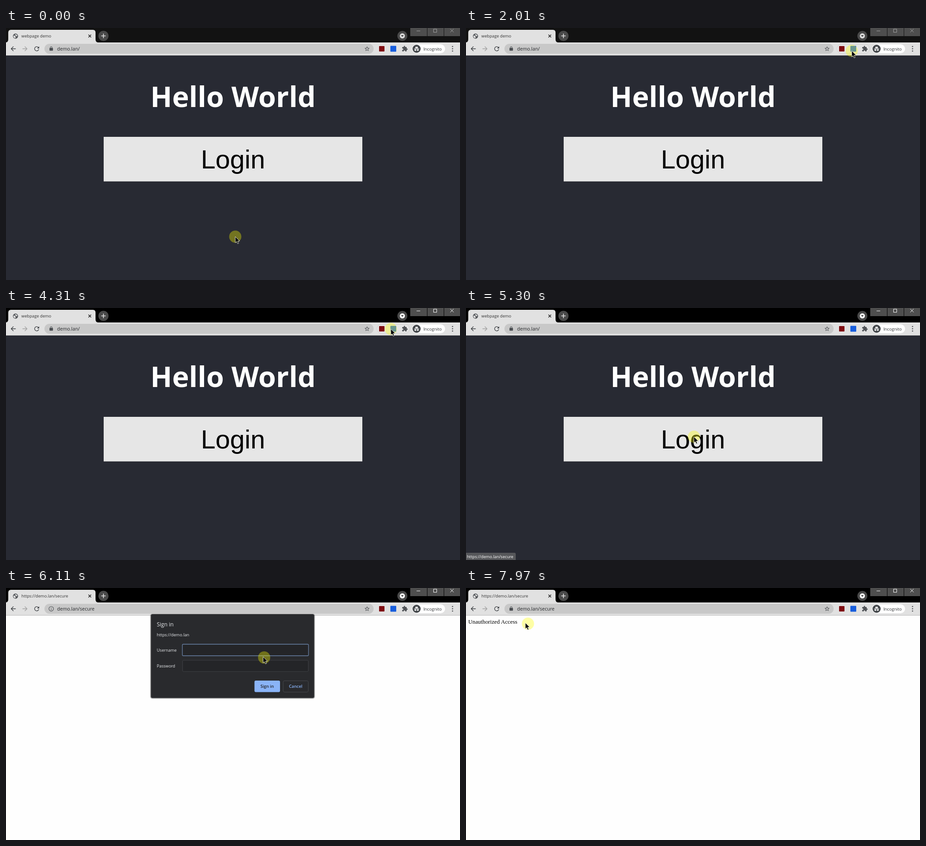
These frames come from a looping animation (1004 by 558 pixels, 8000 ms). An HTML page:

```html
<!DOCTYPE html>
<html lang="en">
<head>
<meta charset="utf-8">
<title>webpage demo</title>
<style>
  html, body { margin: 0; width: 100%; height: 100%; overflow: hidden; background: #282a33; }
  svg { position: absolute; left: 0; top: 0; width: 1004px; height: 558px; }
  text { font-family: "Open Sans", "Noto Sans", sans-serif; white-space: pre; }
  #dialog { transform-origin: 501px 150.5px; }
</style>
</head>
<body>
<svg id="base" viewBox="0 0 1004 558"></svg>
<svg id="dialog" viewBox="0 0 1004 558"></svg>
<svg id="top" viewBox="0 0 1004 558"></svg>
<script>
const LOOP = 8000;
const $ = id => document.getElementById(id);

// Icon outlines on a 24 unit grid
const ICONS = {
  back: 'M20 11H7.83l5.59-5.59L12 4l-8 8 8 8 1.41-1.41L7.83 13H20z',
  reload: 'M17.65 6.35A7.96 7.96 0 0 0 12 4a8 8 0 1 0 7.73 10h-2.08A6 6 0 1 1 12 6c1.66 0 3.14.69 4.22 1.78L13 11h7V4z',
  star: 'M22 9.24l-7.19-.62L12 2 9.19 8.63 2 9.24l5.46 4.73L5.82 21 12 17.27 18.18 21l-1.63-7.03zM12 15.4l-3.76 2.27 1-4.28-3.32-2.88 4.38-.38L12 6.1l1.71 4.04 4.38.38-3.32 2.88 1 4.28z',
  puzzle: 'M20.5 11H19V7c0-1.1-.9-2-2-2h-4V3.5a2.5 2.5 0 0 0-5 0V5H4c-1.1 0-2 .9-2 2v3.8h1.5a2.7 2.7 0 0 1 0 5.4H2V20c0 1.1.9 2 2 2h3.8v-1.5a2.7 2.7 0 0 1 5.4 0V22H17c1.1 0 2-.9 2-2v-4h1.5a2.5 2.5 0 0 0 0-5z',
  lock: 'M18 9h-1V7A5 5 0 0 0 7 7v2H6a2 2 0 0 0-2 2v9a2 2 0 0 0 2 2h12a2 2 0 0 0 2-2v-9a2 2 0 0 0-2-2zM9 9V7a3 3 0 0 1 6 0v2z',
  info: 'M11 7h2v2h-2zm0 4h2v6h-2zm1-9a10 10 0 1 0 0 20 10 10 0 0 0 0-20zm0 18a8 8 0 1 1 0-16 8 8 0 0 1 0 16z',
  folder: 'M9 3H3a2 2 0 0 0-2 2v14a2 2 0 0 0 2 2h18a2 2 0 0 0 2-2V8a2 2 0 0 0-2-2h-9z',
  plane: 'M23 1L1 13l5 2.5L19 5 9 17v6l3.5-4.5L19 21z',
  sync: 'M2 10a10 10 0 0 1 17-5l3-3v8h-8l3-3a7 7 0 0 0-12 3zM22 14a10 10 0 0 1-17 5l-3 3v-8h8l-3 3a7 7 0 0 0 12-3z',
  popout: 'M2 2h11l-3.5 3.5 10 10-3 3-10-10L2 13zM16 4h4a2 2 0 0 1 2 2v14a2 2 0 0 1-2 2H6a2 2 0 0 1-2-2v-4l3-1v4h12V7h-4z',
  plus: 'M9 2h6v7h7v6h-7v7H9v-7H2V9h7z',
  hat: 'M8 3l4 1 4-1 2 7H6zM1 11h22v2H1zM6.5 14a3.5 3.5 0 0 1 3.4 2.7h4.2a3.5 3.5 0 1 1 0 1.6H9.9A3.5 3.5 0 1 1 6.5 14z',
  globe: 'M12 1a11 11 0 1 0 0 22 11 11 0 0 0 0-22zM4 9l6 2 3 4-2 6a9 9 0 0 1-7-12zM11 4l7 2 2 5-4 2-2-3-4-2z'
};

const rect = (x, y, w, h, fill, more = '') =>
  `<rect x="${x}" y="${y}" width="${w}" height="${h}" fill="${fill}" ${more}/>`;
const circle = (x, y, r, fill, more = '') =>
  `<circle cx="${x}" cy="${y}" r="${r}" fill="${fill}" ${more}/>`;
const line = (d, color, w = 1, more = '') =>
  `<path d="${d}" fill="none" stroke="${color}" stroke-width="${w}" ${more}/>`;
const text = (s, x, y, size, fill, more = '') =>
  `<text x="${x}" y="${y}" font-size="${size}" fill="${fill}" ${more}>${s}</text>`;
const icon = (name, cx, cy, size, fill, more = '') =>
  `<path d="${ICONS[name]}" fill="${fill}" fill-rule="evenodd" transform="translate(${cx - size / 2} ${cy - size / 2}) scale(${size / 24})" ${more}/>`;
const group = (id, body) => `<g id="${id}">${body}</g>`;
const mid = 'text-anchor="middle"';

function gear(x, y, r) {
  const step = 2 * Math.PI * r / 16;
  return circle(x, y, r * .8, 'none', `stroke="#a8a8a8" stroke-width="${r * .6}"`) +
    circle(x, y, r, 'none', `stroke="#a8a8a8" stroke-width="${r * .7}" stroke-dasharray="${step}"`);
}

function windowBar() {
  return rect(0, 0, 1004, 32, '#121212', 'id="title"') +
    '<path d="M0 32Q5 31 5 25V10Q5 4 11 4H192Q198 4 198 10V25Q198 31 203 32z" fill="#e1e1e1"/>' +
    icon('globe', 21, 18, 12.5, '#55585c', 'id="favicon"') +
    text('webpage demo', 34, 21, 9.2, '#333', 'id="tab"') +
    line('M182.3 14.8l6 6m0-6l-6 6', '#222', 1.5) +
    circle(215.5, 17.5, 11.2, '#494949') +
    line('M210.5 17.5h10m-5-5v10', '#e8e8e8', 1.6) +
    circle(876.5, 17.5, 11, '#494949') +
    circle(876.5, 17.5, 5.7, '#d8d8d8', 'id="menu"') +
    '<path d="M873.5 16h6l-3 3.6z" fill="#333"/>' +
    rect(894, 0, 37, 18, '#4e4e4e') + rect(932, 0, 36, 18, '#4e4e4e') + rect(969, 0, 35, 18, '#4e4e4e') +
    line('M908 6.5h8M945.5 2.5h7v7h-7zM982.5 2l7.5 7.5m0-7.5l-7.5 7.5', '#a2a2a2', 1, 'id="marks"');
}

function toolbar() {
  return rect(0, 32, 1004, 29, '#e1e1e1') + rect(0, 60, 1004, 1, '#b9b9b9') +
    icon('back', 16, 46, 16.5, '#3c3f43') +
    `<g transform="translate(84 0) scale(-1 1)">${icon('back', 42, 46, 16.5, '#a3a3a3')}</g>` +
    icon('reload', 68, 46, 16, '#3c3f43') +
    rect(85, 35, 728, 22, '#c8c8c8', 'rx="11"') +
    icon('lock', 100, 45.5, 11.5, '#4b4e52', 'id="lock"') +
    icon('info', 100, 46, 13.5, '#4b4e52', 'id="info"') +
    text('demo.lan/', 113, 50, 10.55, '#26282b', 'id="url"') +
    icon('star', 798.5, 46, 13.5, '#4b4e52') +
    rect(820, 36, 73, 20, '#e5e5e5', 'id="capsule" rx="10" stroke="#cfcfcf"') +
    circle(856.5, 46, 10, '#c3c6cb', 'id="pressed"') +
    rect(825, 40, 12, 12, '#7f0c12', 'rx="1"') +
    rect(850, 39.5, 13, 13, '#175ddc', 'rx="1"') +
    icon('puzzle', 882, 46, 14, '#505357') +
    rect(898, 36, 73, 20, '#fff', 'rx="10"') +
    circle(908, 46, 9, '#45484c') + icon('hat', 908, 46, 12.5, '#fff') +
    text('Incognito', 923, 49.5, 9.4, '#2c2e31') +
    [41, 46, 51].map(y => circle(987.5, y, 1.35, '#45484c')).join('');
}

function home() {
  return rect(0, 61, 1004, 497, '#282a33') +
    text('Hello World', 502, 175, 63, '#fff', mid + ' font-weight="700"') +
    rect(216, 241, 572, 98.7, '#e6e6e6') +
    text('Login', 502, 311, 58, '#000', mid + ' style="font-family:\'Liberation Sans\',Arial,sans-serif"');
}

function popup() {
  const tabs = [['Tab', 595], ['My vault', 655.5], ['Send', 716], ['Generator', 776], ['Settings', 836.5]];
  return rect(563, 58, 306, 487, '#000', 'opacity=".25" rx="2"') +
    rect(565, 59, 302, 484, '#222') +
    rect(565, 59, 302, 34, '#363636') + rect(565, 93, 302, 1, '#181818') +
    icon('popout', 581, 75, 16, '#fff') +
    rect(600, 64, 232, 23, '#222', 'rx="3"') +
    circle(613, 75, 3.7, 'none', 'stroke="#8d8d8d" stroke-width="1.5"') +
    line('M615.7 78l3.3 3.5', '#8d8d8d', 1.9) +
    text('Search vault', 624, 80, 11.3, '#808080') +
    rect(624.5, 69, 1, 14, '#fff', 'id="searchCaret"') +
    icon('plus', 849.5, 75, 14, '#fff') +
    text('LOGINS', 573, 114, 11.3, '#a8a8a8') +
    text('0', 859, 114, 11.3, '#a8a8a8', 'text-anchor="end"') +
    rect(565, 121, 302, 83, '#181818') + rect(565, 122, 302, 81, '#363636') +
    text('There are no logins available to auto-fill for the', 716, 142, 11.3, '#fff', mid) +
    text('current browser tab.', 716, 157, 11.3, '#fff', mid) +
    text('Add a login', 715.5, 186, 11.3, '#52b4fb', mid) +
    rect(565, 498, 302, 45, '#363636') + rect(565, 498, 302, 1, '#181818') +
    icon('folder', 595, 513.5, 20, '#52b4fb') + icon('lock', 655.5, 513.5, 18, '#a8a8a8') +
    icon('plane', 716, 514, 20, '#a8a8a8') + icon('sync', 776, 514, 19, '#a8a8a8') +
    gear(833, 514, 5) + gear(843.5, 509, 3) + gear(843.5, 519, 3) +
    tabs.map(([s, x], i) => text(s, x, 535.5, 9.65, i ? '#a8a8a8' : '#52b4fb', mid)).join('');
}

function dialog() {
  const bold = mid + ' font-weight="600"';
  return rect(318.5, 57, 365, 188.5, '#000', 'opacity=".18" rx="5"') +
    rect(319.5, 57.5, 363, 187, '#000', 'opacity=".25" rx="4"') +
    rect(320.5, 58, 361, 185.5, '#292a2d', 'rx="4"') +
    text('Sign in', 333.5, 84.5, 12, '#e8eaed') +
    text('https://demo.lan', 333.5, 106.5, 9.2, '#e8eaed') +
    text('Username', 333.5, 140.5, 9.05, '#e8eaed') +
    text('Password', 333.5, 176, 9.05, '#e8eaed') +
    rect(390, 124.5, 279, 25.5, '#242528', 'rx="2" stroke="#6a83a8" stroke-width="1.3"') +
    rect(390.5, 160, 278, 25, '#242528', 'rx="2" stroke="#3f4145"') +
    rect(396.5, 130, 1, 13, '#e8eaed', 'id="userCaret"') +
    rect(549.5, 205, 56.5, 25.5, '#8ab4f8', 'rx="3"') +
    text('Sign in', 577.5, 221, 9.3, '#202124', bold) +
    rect(613, 205.5, 55.5, 25, 'none', 'rx="3" stroke="#46484c"') +
    text('Cancel', 640.5, 221, 9.3, '#8ab4f8', bold);
}

$('base').innerHTML = group('home', home()) +
  group('secure', rect(0, 61, 1004, 497, '#fefefe') +
    text('Unauthorized Access', 5, 79, 12.8, '#000', 'id="denied" style="font-family:\'Liberation Serif\',\'Times New Roman\',serif"')) +
  windowBar() + toolbar() + group('popup', popup());
$('dialog').innerHTML = dialog();
$('top').innerHTML =
  group('bubble', '<path d="M0 542H107Q110 542 110 545V558H0z" fill="#56575a"/>' + text('https://demo.lan/secure', 2, 554, 9.15, '#fff')) +
  circle(0, 0, 13.5, '#ff0', 'id="halo" opacity=".35"') +
  '<path id="arrow" d="M0 0V13.5L3 10.7 5.3 15.7 7.6 14.7 5.4 9.8H9.8z" stroke="#fff" stroke-width=".8"/>';

const BURSTS = [[500, 1440, 8], [1560, 2010, 4], [2130, 2250, 2], [2650, 3100, 4], [3250, 3670, 4],
  [3790, 4310, 4], [4620, 5420, 7], [5570, 5570, 1], [5690, 6110, 4], [6230, 6650, 4], [6800, 7730, 8], [7850, 7970, 2]];
const TICKS = [0];
for (const [a, b, n] of BURSTS)
  for (let i = 0; i < n; i++) TICKS.push(n > 1 ? a + (b - a) * i / (n - 1) : a);

// Small counterclockwise circles drawn with the mouse inside the dialog
const CIRCLING = [];
for (let t = 5950; t <= 6620; t += 30) {
  const a = -.93 - (t - 6110) * 2 * Math.PI / 320;
  CIRCLING.push([t, 550.5 + 34 * Math.cos(a), 181 + 34 * Math.sin(a)]);
}

// Mouse path: time, x, y
const PATH = [
  [0, 507, 462], [400, 507, 462], [1440, 896, 71], [1860, 860, 50], [2010, 853, 50.5], [2600, 853, 50.5],
  [3100, 785, 154], [3350, 715, 178], [3560, 712, 172], [3790, 780, 112], [4030, 868, 36],
  [4310, 851, 46.5], [4520, 851, 46.5], [5290, 504, 285], [5620, 504, 285],
  ...CIRCLING,
  [7050, 640, 217], [7480, 640, 217], [7730, 517, 203], [7850, 322, 140], [7970, 137, 79], [8090, -20, 28]
];

// Slope at a key, zero where the mouse rests on either side
function slope(i, n) {
  const p = PATH[i - 1], q = PATH[i], r = PATH[i + 1];
  if (!p || !r || p[n] === q[n] || q[n] === r[n]) return 0;
  return (r[n] - p[n]) / (r[0] - p[0]);
}

function mouse(t) {
  const i = PATH.findIndex((p, j) => j === PATH.length - 2 || PATH[j + 1][0] > t);
  const a = PATH[i], b = PATH[i + 1], d = b[0] - a[0], k = (t - a[0]) / d;
  const s = k * k * (3 - 2 * k);
  return [1, 2].map(n => a[n] + (b[n] - a[n]) * s +
    d * k * (1 - k) * (slope(i, n) * (1 - k) - slope(i + 1, n) * k));
}

const show = (id, on) => $(id).setAttribute('visibility', on ? 'visible' : 'hidden');
const move = (id, [x, y]) => $(id).setAttribute('transform', `translate(${x} ${y})`);
const blink = (t, start) => Math.floor((t - start) / 530) % 2 === 0;

function render(now) {
  const real = now % LOOP;
  const t = TICKS.filter(k => k <= real + .01).pop();
  const active = t >= 2130, moved = t >= 5400, denied = t >= 7320;
  const open = t >= 2650 && t < 4130;

  $('title').setAttribute('fill', active ? '#000' : '#121212');
  $('marks').setAttribute('stroke', active ? '#fff' : '#a2a2a2');
  $('menu').setAttribute('fill', active ? '#fff' : '#d8d8d8');
  $('tab').textContent = moved ? 'https://demo.lan/secure' : 'webpage demo';
  $('url').textContent = moved ? 'demo.lan/secure' : 'demo.lan/';
  $('favicon').setAttribute('opacity', moved && t < 5500 ? .6 : 1);

  show('home', !moved);
  show('secure', moved);
  show('denied', denied);
  show('lock', !moved || denied);
  show('info', moved && !denied);
  show('capsule', t >= 1850 && t < 4700);
  show('pressed', active && t < 4130);
  show('popup', open);
  show('searchCaret', open && blink(t, 2650));
  show('bubble', t >= 5150 && t < 5690);

  const p = t < 5400 || t >= 7190 ? 0 : Math.min(1, (t - 5390) / 150);
  const d = $('dialog').style, q = 1 - p;
  d.opacity = p;
  d.transform = q && p ? `translateY(${-12.5 * q}px) perspective(880px) translateZ(${6 * q}px) rotateX(${7.5 * q}deg)` : 'none';
  $('userCaret').setAttribute('opacity', blink(t, 5420) ? 1 : 0);

  // The halo trails the arrow by a few milliseconds
  move('halo', mouse(t));
  move('arrow', mouse(t + 4));
}

let start;
function loop(now) {
  start ??= now;
  render(now - start);
  requestAnimationFrame(loop);
}
render(0);
requestAnimationFrame(loop);
</script>
</body>
</html>
```
